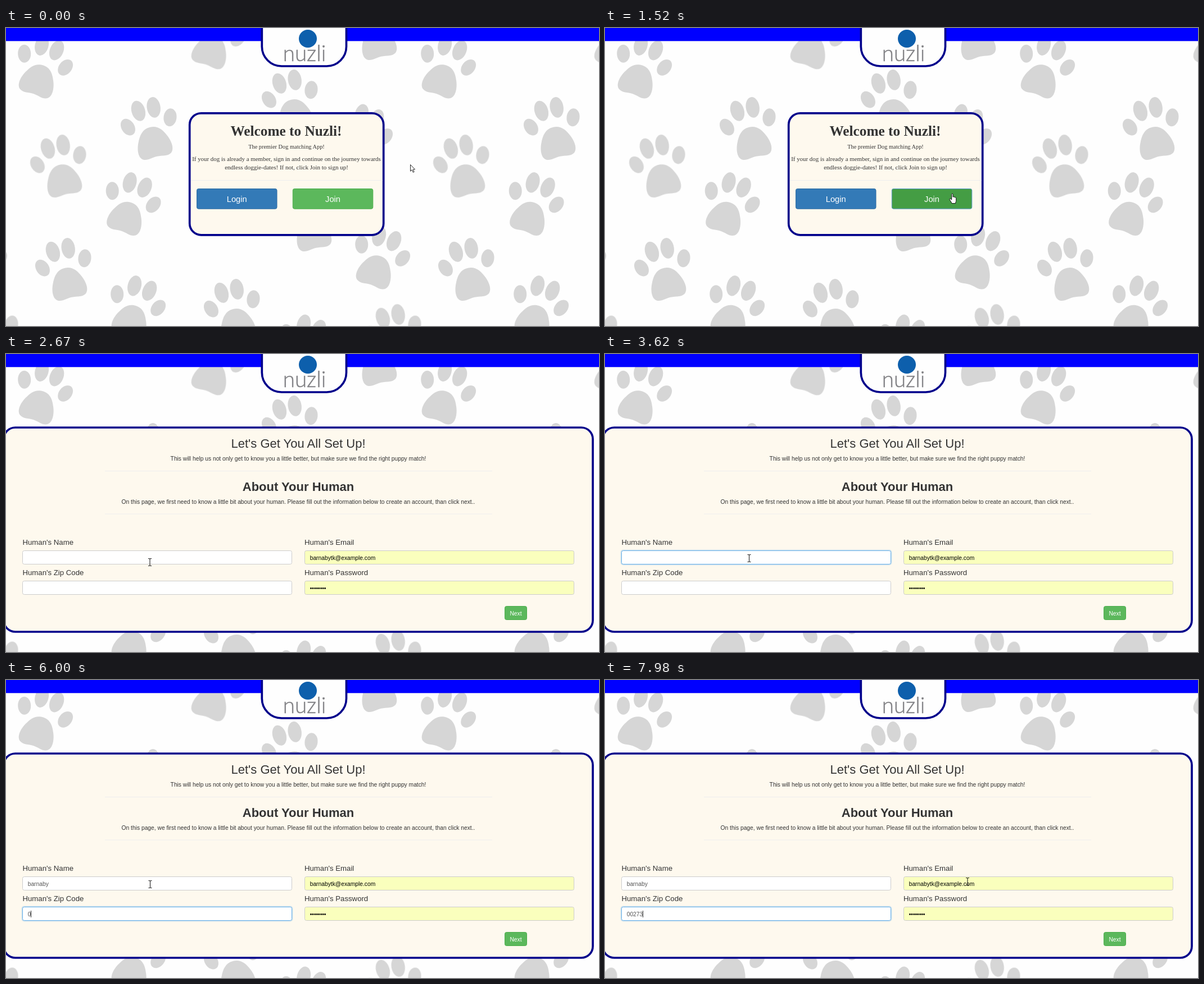
An HTML page that plays this animation: 1055x531 px, repeating every 8000 ms.

```html
<!DOCTYPE html>
<html lang="en">
<head>
<meta charset="utf-8">
<title>Sign up</title>
<style>
html, body { margin: 0; width: 100%; height: 100%; overflow: hidden; background: #fefefe; }
svg { display: block; width: 100vw; height: 100vh; }
text { font-family: "Liberation Sans", Arial, sans-serif; font-size: 10.27px; fill: #333; }
.mid { text-anchor: middle; }
.serif { font-family: "Liberation Serif", "Times New Roman", serif; }
.mark { font-family: Lato, sans-serif; font-weight: 300; font-size: 38.5px; fill: #808084; stroke: #808084; stroke-width: .5; }
.light { fill: #fff; }
.card { fill: #fef9ee; stroke: #00008b; stroke-width: 3.7; }
.rule { stroke: #eee; }
</style>
</head>
<body>
<svg viewBox="0 0 1055 531" xmlns="http://www.w3.org/2000/svg">
  <defs>
    <filter id="soft"><feGaussianBlur stdDeviation=".6"/></filter>
    <g id="paw" fill="#d6d6d6">
      <path d="M0-29C14-29 21-19 26-8C31 2 34 18 26 24C18 29 10 24.5 0 24.5C-10 24.5-18 29-26 24C-34 18-31 2-26-8C-21-19-14-29 0-29Z"/>
      <ellipse rx="11.5" ry="16" transform="translate(-38.5 -38) rotate(-20)"/>
      <ellipse rx="12" ry="18.5" transform="translate(-14 -62) rotate(-4)"/>
      <ellipse rx="12" ry="18.5" transform="translate(14 -62) rotate(4)"/>
      <ellipse rx="11.5" ry="16" transform="translate(38.5 -38) rotate(20)"/>
    </g>
  </defs>
  <rect width="1055" height="531" fill="#fefefe"/>
  <g id="paws" filter="url(#soft)"></g>
  <rect width="1055" height="23.3" fill="#00f"/>
  <path d="M455.3-6V33a35 35 0 0 0 35 35h80.2a35 35 0 0 0 35-35V-6Z" fill="#fefefe" stroke="#00008b" stroke-width="3.7"/>
  <g id="logo">
    <circle cx="537" cy="19" r="16" fill="#0d5fac"/>
    <text class="mid mark" x="531" y="59">nuzli</text>
  </g>
  <g id="welcome"></g>
  <g id="form"></g>
  <g id="mouse">
    <path id="arrow" d="M.5.5V12.2L3.2 9.7L5.2 14.2L7.1 13.4L5.2 9H8.6Z" fill="#fff" stroke="#111" stroke-width=".9"/>
    <path id="hand" d="M-1.3 11V1.3C-1.3-.1 1-.1 1 1.3V6.2C1.2 5.2 3 5.4 3.1 6.6C3.6 5.8 5 6.1 5 7.2C5.6 6.6 6.7 7 6.7 8.1V12.2C6.7 14.3 5.7 15.2 5.6 17.5H-1C-1.3 15.4-4.8 12-5 10.3C-5 8.8-3.2 8.7-2.4 9.9Z" fill="#fff" stroke="#111" stroke-width="1"/>
    <path id="beam" d="M-3-6.5H-1.2L0-5.8L1.2-6.5H3M0-5.8V5.8M-3 6.5H-1.2L0 5.8L1.2 6.5H3" fill="none" stroke="#222" stroke-width="1.1"/>
  </g>
</svg>
<script>
const LOOP = 8000, TILE = 717;
const $ = id => document.getElementById(id);
const show = (id, on) => $(id).setAttribute("visibility", on ? "visible" : "hidden");
const set = (id, attrs) => { for (const k in attrs) $(id).setAttribute(k, attrs[k]); };

// Pad centres of the wallpaper, grouped by tilt
const right = [[57, 94], [213.5, 338.5], [222, 522.5], [657, 434], [626, 217], [364, 42], [523, 592]];
const left = [[263, 205], [102, 272], [111, 456], [411, 529], [514, 156], [662, 27], [546, 368], [698, 574]];
const tilted = (list, deg) => list.flatMap(([x, y]) => [-TILE, 0, TILE].map(dx =>
  `<use href="#paw" transform="translate(${x + dx} ${y}) rotate(${deg})"/>`)).join("");
$("paws").innerHTML = tilted(right, 18.7) + tilted(left, -13);

const label = (x, y, str, size = 10.27, cls = "mid", extra = "") =>
  `<text class="${cls}" x="${x}" y="${y}" style="font-size:${size}px;${extra}">${str}</text>`;
const rule = (x1, x2, y) => `<path class="rule" d="M${x1} ${y}H${x2}"/>`;
const button = (id, x, y, w, h, fill, edge) =>
  `<rect id="${id}" x="${x + .5}" y="${y + .5}" width="${w - 1}" height="${h - 1}" rx="3" fill="${fill}" stroke="${edge}"/>`;
const field = (id, x, y) => `<rect id="${id}Glow" x="${x}" y="${y}" width="480" height="25" rx="3.5" fill="none" stroke="#66afe9" stroke-width="3" opacity="0"/>
  <rect id="${id}" x="${x + .5}" y="${y + .5}" width="479" height="24" rx="3" fill="#fff" stroke="#ccc"/>
  <text id="${id}Text" x="${x + 9.7}" y="${y + 16.5}" style="fill:${x < 500 ? "#555" : "#000"}"></text>
  <rect id="${id}Caret" y="${y + 7}" width="1" height="12" fill="#333"/>`;

$("welcome").innerHTML =
  `<rect class="card" x="326.7" y="151.8" width="345" height="217" rx="20.5"/>` +
  label(498.5, 192, "Welcome to Nuzli!", 25.3, "mid serif", "font-weight:bold") +
  label(499, 215, "The premier Dog matching App!", 10.35, "mid serif") +
  label(499, 237, "If your dog is already a member, sign in and continue on the journey towards", 10.9, "mid serif") +
  label(499, 251.5, "endless doggie-dates! If not, click Join to sign up!", 11, "mid serif") +
  rule(329, 670, 271.5) +
  button("login", 339, 286, 143.5, 36.7, "#337ab7", "#2e6da4") + label(410.7, 309.7, "Login", 14.67, "mid light") +
  button("join", 509.8, 286, 143.5, 36.7, "#5cb85c", "#4cae4c") + label(581.5, 309.7, "Join", 14.67, "mid light");

$("form").innerHTML =
  `<rect class="card" x="-4" y="131" width="1048" height="364" rx="20.5"/>` +
  label(520, 167, "Let's Get You All Set Up!", 22) +
  label(520, 190, "This will help us not only get to know you a little better, but make sure we find the right puppy match!") +
  rule(176, 865, 208.5) +
  label(520, 244, "About Your Human", 22, "mid", "font-weight:bold") +
  label(520, 266.5, "On this page, we first need to know a little bit about your human. Please fill out the information below to create an account, than click next..") +
  rule(176, 865, 285) +
  label(29.5, 340, "Human's Name", 13.2, "") + label(531, 340, "Human's Email", 13.2, "") +
  label(29.5, 393.5, "Human's Zip Code", 13.2, "") + label(531, 393.5, "Human's Password", 13.2, "") +
  field("name", 29, 350) + field("email", 531, 350) +
  field("zip", 29, 404) + field("pass", 531, 404) +
  button("next", 887, 449, 40, 25, "#5cb85c", "#4cae4c") + label(907, 465.5, "Next", 10.27, "mid light");

// Pointer strokes: first step, last step, number of steps, way points
const strokes = [
  [280, 890, 9, [[719, 243], [734, 254], [700, 280], [645, 298], [607, 302]]],
  [1440, 1520, 2, [[607, 302], [618, 295]]],
  [1977, 2670, 10, [[618, 295], [480, 318], [256, 371]]],
  [2750, 3210, 7, [[256, 371], [257, 374.5], [256.5, 364]]],
  [7290, 7510, 4, [[256.5, 364], [400, 344], [562, 330]]],
  [7680, 7980, 5, [[562, 330], [645, 359]]]
];

function pointer(t) {
  let pos = strokes[0][3][0];
  for (const [from, to, steps, pts] of strokes) {
    if (t < from) break;
    const k = Math.floor((t - from) / (to - from) * (steps - 1) + 1.001);
    const u = Math.min(1, k / steps), n = pts.length - 1;
    const s = u * u * (3 - 2 * u) * n, i = Math.min(n - 1, Math.floor(s));
    pos = [0, 1].map(a => pts[i][a] + (pts[i + 1][a] - pts[i][a]) * (s - i));
  }
  return pos;
}

const within = (v, a, b) => v >= a && v <= b;
const during = (t, spans) => spans.some(([a, b]) => t >= a && t < b);
const ramp = (t, t0) => t < t0 ? 0 : t < t0 + 75 ? .5 : 1;
const typed = (str, times, t) => str.slice(0, times.filter(at => t >= at).length);

const nameKeys = [3980, 4300, 4450, 4520, 4690, 4690, 4760];
const zipKeys = [6000, 6170, 6320, 6490, 6590];

function entry(id, str, focus, caret) {
  const text = $(id + "Text");
  if (text.textContent !== str) text.textContent = str;
  set(id + "Glow", { opacity: focus * .3 });
  set(id, { stroke: focus > .6 ? "#66afe9" : focus ? "#99bddb" : "#ccc" });
  const width = str ? text.getComputedTextLength() : 0;
  set(id + "Caret", { x: Math.round(38.7 + width), opacity: caret ? 1 : 0 });
}

function filled(id, str, on) {
  $(id + "Text").textContent = on ? str : "";
  set(id, { fill: on ? "#faffbd" : "#fff" });
  set(id + "Caret", { opacity: 0 });
}

function draw(t) {
  const second = t >= 1900, [x, y] = pointer(t);
  show("welcome", !second);
  show("form", second);
  show("logo", !during(t, [[1900, 1977]]));

  const overJoin = !second && within(x, 510, 654) && within(y, 286, 323);
  const overText = second && (within(x, 531, 620) && within(y, 328, 342) ||
    within(y, 350, 375) && (within(x, 29, 509) || within(x, 531, 1011)));
  show("hand", overJoin);
  show("beam", overText);
  show("arrow", !overJoin && !overText);
  set("mouse", { transform: `translate(${x} ${y})` });

  const pressed = during(t, [[1210, 1290]]);
  set("join", {
    fill: pressed ? "#398439" : overJoin ? "#449d44" : "#5cb85c",
    stroke: t >= 1210 ? "#5b9bc8" : overJoin ? "#398439" : "#4cae4c"
  });

  const tab = ramp(t, 5070);
  entry("name", typed("barnaby", nameKeys, t), ramp(t, 3133) * (1 - tab),
    during(t, [[3133, 3620], [3980, 5070]]));
  entry("zip", typed("00273", zipKeys, t), tab,
    during(t, [[5150, 5620], [6000, 7120], [7680, LOOP]]));
  filled("email", "barnabytk@example.com", t >= 2054);
  filled("pass", "\u2022".repeat(8), t >= 2054);
}

function frame() {
  draw(performance.now() % LOOP);
  requestAnimationFrame(frame);
}
frame();
</script>
</body>
</html>
```
